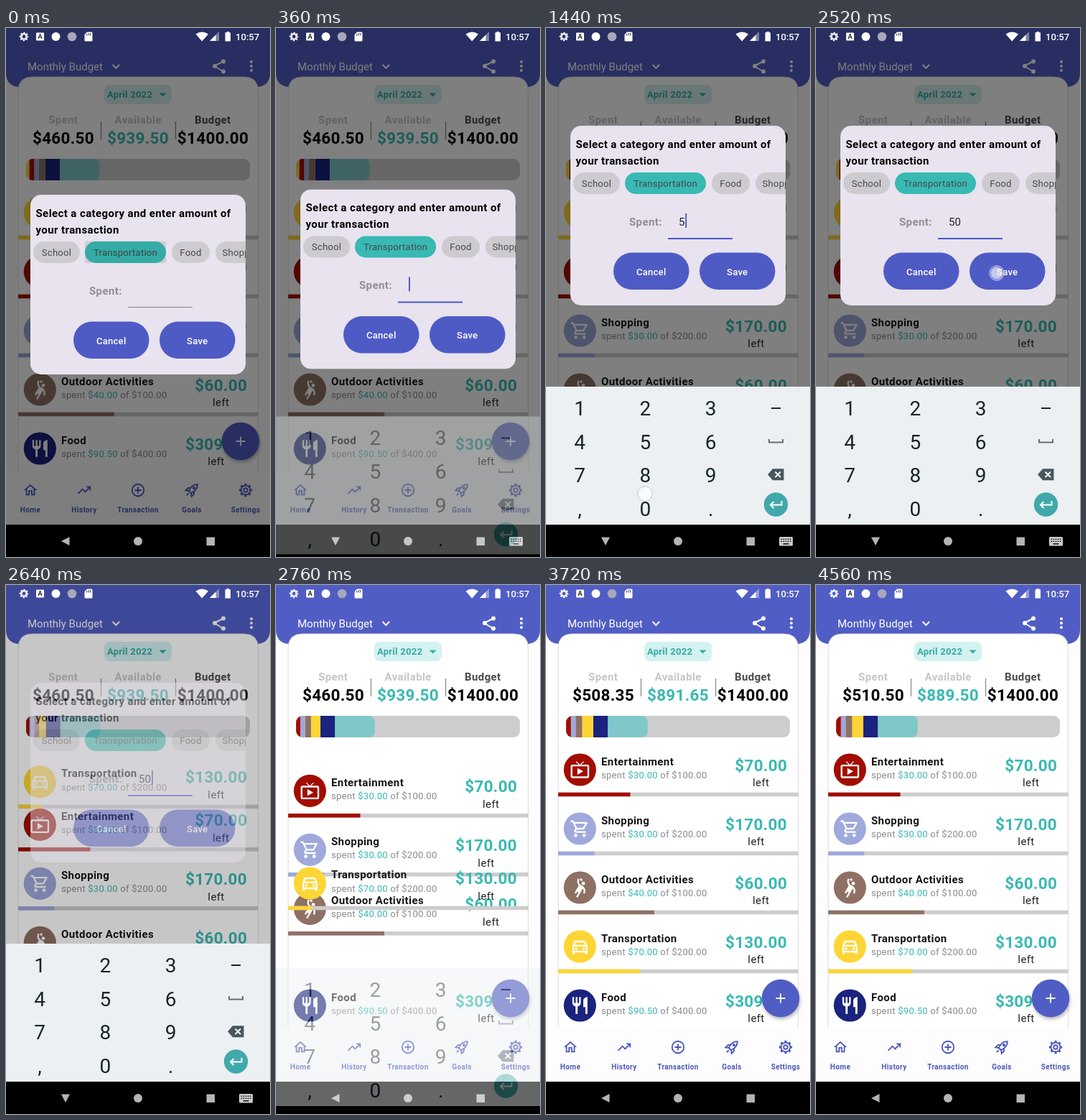
Recreate the animation shown at these times as an HTML page. Size 368 by 736 pixels, loop 4.8 s.

```html
<!DOCTYPE html>
<html lang="en">
<head>
<meta charset="utf-8">
<title>Monthly Budget</title>
<style>
  :root { --t: 0; --indigo: #505dc4; --teal: #39b9b2; }
  html, body { margin: 0; width: 100%; height: 100%; overflow: hidden; background: #fff; }
  svg { display: block; width: 368px; height: 736px; font-family: Roboto, "Noto Sans", sans-serif; }
  .body { font-size: 15px; letter-spacing: .4px; }
  .small { font-size: 13.1px; letter-spacing: .23px; }
  .big { font-size: 22.5px; letter-spacing: .3px; font-weight: 700; }
  .tab { font-size: 10px; letter-spacing: .4px; font-weight: 700; }
  .key { font-size: 28px; fill: #16242b; }
  .bold { font-weight: 700; }
  .mid { text-anchor: middle; }
  .line { fill: none; stroke: currentColor; stroke-width: 2; }

  /* The clock in --t drives every paused animation. */
  .dialog, .scrim, .lift, .keys, .move, .grow, .slot {
    animation: 4800ms linear calc(var(--t) * -1ms) infinite both paused;
  }
  .dialog, .scrim { animation-name: close; }
  .lift { animation-name: lift; }
  .keys { animation-name: keys; }
  .move { animation-name: move; }
  .grow { animation-name: grow; }
  .slot { animation-name: slot, tint; }

  @keyframes close { 0%, 53.4% { opacity: 1 } 56.3%, 100% { opacity: 0 } }
  @keyframes lift {
    0%, 7.3% { transform: none; animation-timing-function: ease-out }
    11.5%, 100% { transform: translateY(-96px) }
  }
  @keyframes keys {
    0%, 6.5% { transform: translateY(60px); opacity: 0; animation-timing-function: ease-out }
    11.5%, 55% { transform: none; opacity: 1 }
    57.5% { transform: translateY(34px); opacity: .43 }
    60%, 100% { transform: translateY(68px); opacity: 0 }
  }
  @keyframes move {
    0%, 53.85% { transform: translateY(var(--from)); animation-timing-function: ease-in-out }
    60.1%, 100% { transform: none }
  }
  @keyframes grow { 0%, 57.56% { width: 33.5px } 78.4%, 100% { width: 117px } }
  @keyframes slot {
    0%, 53.85% { x: var(--x0); width: var(--w0); animation-timing-function: ease-in-out }
    60.1%, 100% { x: var(--x1); width: var(--w1) }
  }
  @keyframes tint { 0%, 53.85% { fill: var(--c0) } 53.86%, 100% { fill: var(--c1) } }

  .typing .back { transform: rotate(-90deg); }
  .back { transform-origin: 83px 714px; }
  .kbIcon { visibility: hidden; }
  .typing .kbIcon { visibility: visible; }
  .underline { fill: #85818a; height: 1px; }
  .focused .underline { fill: #4957c6; height: 2px; }
</style>
</head>
<body>
<svg id="stage" viewBox="0 0 368 736">
  <defs>
    <clipPath id="barClip"><rect x="28" y="182" width="312" height="30" rx="9"/></clipPath>
    <clipPath id="dialogClip"><rect x="34" y="232" width="300" height="250" rx="15"/></clipPath>
    <filter id="soft" x="-30%" y="-30%" width="160%" height="160%"><feGaussianBlur stdDeviation="2.5"/></filter>
  </defs>

  <rect width="368" height="736" fill="#fdfcfe"/>
  <path d="M0 0H368V62Q368 82 348 82H20Q0 82 0 62Z" fill="var(--indigo)"/>

  <g color="#fff" fill="#fff">
    <text x="30" y="59" font-size="15">Monthly Budget</text>
    <path class="line" d="M148.500 51L153.300 55.800L158.100 51"/>
    <path class="line" stroke-width="1.6" d="M292 52L302 47M292 54L302 60"/>
    <circle cx="291" cy="53" r="3"/><circle cx="303" cy="46.500" r="3"/><circle cx="303" cy="60.500" r="3"/>
    <circle cx="342" cy="47" r="2"/><circle cx="342" cy="53" r="2"/><circle cx="342" cy="59" r="2"/>
  </g>

  <path d="M17 620V88Q17 68 37 68H331.500Q351.500 68 351.500 88V620" fill="#fff" stroke="#dcdce0"/>
  <rect x="137" y="79" width="94" height="27" rx="8" fill="#d3f2f0"/>
  <text class="small bold" x="141" y="97.300" fill="#37aca6">April 2022</text>
  <path d="M213.500 90.500H223.500L218.500 95.500Z" fill="#37aca6"/>

  <g class="body bold mid">
    <text x="79.700" y="133.300" fill="#c6c6c8">Spent</text>
    <text x="184.200" y="133.300" fill="#c6c6c8">Available</text>
    <text x="288.300" y="133.300" fill="#4a4a4c">Budget</text>
  </g>
  <path d="M132.500 130V155M236.500 130V155" stroke="#8c8c8e" stroke-width="1.300"/>
  <g class="big mid">
    <text id="spent" x="80" y="161">$460.50</text>
    <text id="avail" x="184" y="161" fill="var(--teal)">$939.50</text>
    <text x="288.500" y="161">$1400.00</text>
  </g>
  <rect x="28" y="182" width="312" height="30" rx="9" fill="#cdcdcd"/>
  <g id="bar" clip-path="url(#barClip)"></g>

  <g id="rows"></g>
  <rect y="615.500" width="368" height="76" fill="#fdfdff"/>
  <g id="tabs" color="#4c58b9"></g>
  <circle cx="328" cy="578" r="26" opacity=".3" filter="url(#soft)"/>
  <circle cx="327" cy="575" r="26.300" fill="var(--indigo)"/>
  <path d="M320.500 575H333.500M327 568.500V581.500" stroke="#fff" stroke-width="1.800"/>

  <rect class="scrim" width="368" height="692" fill-opacity=".5"/>

  <g class="dialog"><g class="lift">
    <rect x="34" y="232" width="300" height="250" rx="15" fill="#e8e3ee"/>
    <g class="body bold">
      <text x="41.500" y="262.500">Select a category and enter amount of</text>
      <text x="41.500" y="285.500">your transaction</text>
      <text x="116" y="370.500" fill="#918d95">Spent:</text>
    </g>
    <rect id="press" x="110" y="296.500" width="113" height="30.500" opacity=".1"/>
    <g id="chips" clip-path="url(#dialogClip)"></g>
    <rect class="underline" x="170" y="388" width="90"/>
    <text id="typed" x="185" y="370.500" font-size="15" fill="#222"></text>
    <rect id="caret" y="354" width="1.800" height="20" fill="#4453c4"/>
    <g fill="#4f5bc5">
      <rect x="94" y="408.500" width="105.500" height="51.500" rx="25.700"/>
      <rect x="214" y="408.500" width="105.500" height="51.500" rx="25.700"/>
    </g>
    <g class="small mid" font-weight="500" fill="#fff">
      <text x="146.700" y="439.500">Cancel</text>
      <text x="266.700" y="439.500">Save</text>
    </g>
  </g></g>

  <g id="status" fill="#fff" color="#fff">
    <rect x="42" y="6.500" width="11" height="11" rx="1"/>
    <text class="mid" x="47.500" y="15.200" font-size="9" font-weight="700" fill="#222">A</text>
    <circle cx="69.500" cy="12" r="6"/>
    <circle cx="92" cy="12" r="6.300" fill="#aaa6bb"/>
    <path d="M113 5.500H119Q120.500 5.500 120.500 7V17Q120.500 18.500 119 18.500H111Q109.500 18.500 109.500 17V9Z"/>
    <path d="M112.500 8V10.500M115 7V10.500M117.500 7V10.500" stroke="#555" stroke-width="1.200"/>
    <path d="M264.500 8.500Q273.200 2.500 282 8.500L273.200 18.500Z"/>
    <path d="M297 5V18H284Z" opacity=".4"/><path d="M292.500 9.500V18H284Z"/>
    <path d="M307.500 5H311V6.300H313V18.500H305.500V6.300H307.500Z"/>
    <text x="320" y="16.600" font-size="13.100" font-weight="500">10:57</text>
  </g>

  <rect y="691" width="368" height="45"/>
  <g fill="#b4b4b4">
    <path class="back" d="M77 714L88.500 708V720Z"/>
    <circle cx="184" cy="714" r="6"/>
    <rect x="279.500" y="708.500" width="11.500" height="11.500"/>
    <g class="kbIcon">
      <rect x="325" y="708" width="19" height="12.500" rx="1.500" fill="#ccc"/>
      <path d="M327.500 711.300H342M327.500 714.300H342" stroke="#111" stroke-width="1.500" stroke-dasharray="1.600 1.500"/>
      <path d="M330.500 717.700H338.500" stroke="#111" stroke-width="1.500"/>
    </g>
  </g>

  <g class="keys">
    <rect y="499" width="368" height="192" fill="#ecf0f2"/>
    <g id="pad" class="key mid"></g>
    <path d="M314 529H327" stroke="#16242b" stroke-width="2"/>
    <path class="line" color="#6c687a" d="M311 572V576.500H330V572"/>
    <path d="M309 621.300L316 613.300H331.500V629.300H316Z" fill="#48565f"/>
    <path d="M319.500 617.500L327 625M327 617.500L319.500 625" stroke="#fff" stroke-width="1.800"/>
    <circle cx="320.500" cy="663" r="16.700" fill="#41a9ab"/>
    <path class="line" color="#fff" d="M328.500 658V663.500H313.500M317.500 659L313 663.500L317.500 668"/>
  </g>

  <g id="tap">
    <circle r="10.500" fill="#fff" fill-opacity=".35" stroke="#b4bae6" stroke-opacity=".7"/>
    <circle r="8" fill="#fff" fill-opacity=".5"/>
  </g>
</svg>

<script>
const $ = id => document.getElementById(id);
const LOOP = 4800, STEP = 120, SAVED = 2585;
const RED = '#a30d00', BLUE = '#9fa9db', BROWN = '#8f7064',
      YELLOW = '#fdd535', NAVY = '#1a237e', AQUA = '#7fc7c9';

// Icons on a 24-unit grid
const gear = (r, hole) => `<g class="line">
  <circle cx="12" cy="12" r="${hole}"/><circle cx="12" cy="12" r="${r}"/>
  <circle cx="12" cy="12" r="${r + 1.8}" stroke-width="2.4" pathLength="16" stroke-dasharray="1" stroke-dashoffset=".5"/></g>`;
const path = d => `<path fill-rule="evenodd" d="${d}"/>`;
const icons = {
  tv: path('M21 6h-7.590l3.290-3.290L16 2l-4 4-4-4-.710.710L10.590 6H3c-1.100 0-2 .890-2 2v12c0 1.100.900 2 2 2h18c1.100 0 2-.900 2-2V8c0-1.110-.900-2-2-2zM21 20H3V8h18v12zM9 10v8l7-4z'),
  cart: path('M15.550 13c.750 0 1.410-.410 1.750-1.030l3.580-6.490c.370-.660-.110-1.480-.870-1.480H5.210l-.940-2H1v2h2l3.600 7.590-1.350 2.440C4.520 15.370 5.480 17 7 17h12v-2H7l1.100-2h7.450zM6.160 6h12.150l-2.760 5H8.530L6.160 6z')
    + '<circle cx="7" cy="20" r="2"/><circle cx="17" cy="20" r="2"/>',
  player: path('M15.840 10.410s-1.630-.940-2.600-1.500c-2.380-1.380-3.200-4.440-1.820-6.820l-1.730-1C8.100 3.830 8.600 7.210 10.660 9.400l-5.150 8.920 1.730 1 1.500-2.600 1.730 1-3 5.200 1.730 1 6.290-10.890c1.140 1.550 1.330 3.690.310 5.460l1.730 1c1.600-2.750 1.280-6.580-1.690-9.080z')
    + '<circle cx="13.500" cy="2.500" r="1.500"/><circle cx="16" cy="7" r="2"/>',
  car: path('M18.920 6C18.720 5.420 18.160 5 17.500 5h-11c-.660 0-1.210.420-1.420 1L3 12v8c0 .550.450 1 1 1h1c.550 0 1-.450 1-1v-1h12v1c0 .550.450 1 1 1h1c.550 0 1-.450 1-1v-8zM6.850 7h10.290l1.080 3.110H5.770zM19 17H5v-5h14z')
    + '<circle cx="7.500" cy="14.500" r="1.500"/><circle cx="16.500" cy="14.500" r="1.500"/>',
  food: path('M11 9H9V2H7V9H5V2H3V9C3 11.120 4.660 12.840 6.750 12.970V22H9.250V12.970C11.340 12.840 13 11.120 13 9V2H11ZM16 6V14H18.500V22H21V2C18.240 2 16 4.240 16 6Z'),
  home: path('M12 5.690L17 10.190V18H15V12H9V18H7V10.190ZM12 3L2 12H5V20H11V14H13V20H19V12H22Z'),
  trend: '<path class="line" d="M2.700 17.300L9.400 10.600L13.400 14.600L20.500 7.500M15.500 7H21V12.500"/>',
  plus: '<g class="line"><circle cx="12" cy="12" r="9"/><path d="M7 12H17M12 7V17"/></g>',
  rocket: `<g class="line" transform="rotate(45 12 12)"><path d="M12 0C16.500 4 16.500 10 14.500 16H9.500C7.500 10 7.500 4 12 0Z"/>
    <circle cx="12" cy="7.500" r="1.200"/><path d="M8.500 10.500L5.500 14V19L9.500 16M15.500 10.500L18.500 14V19L14.500 16M12 18.500V23"/></g>`,
  cog: gear(7, 3),
  solidCog: gear(6.5, 4.6),
};
const icon = (name, x, y, size) =>
  `<g fill="currentColor" transform="translate(${x - size / 2} ${y - size / 2}) scale(${size / 24})">${icons[name]}</g>`;

// Category rows: name, colour, icon, spent, total, x of the sum, start offset
const rows = [
  ['Entertainment', RED, 'tv', 30, 100, 299.7, 82],
  ['Shopping', BLUE, 'cart', 30, 200, 293, 82],
  ['Outdoor Activities', BROWN, 'player', 40, 100, 299.7, 82],
  ['Transportation', YELLOW, 'car', 70, 200, 293, -246],
  ['Food', NAVY, 'food', 90.5, 400, 293, 0],
];
const money = n => '$' + n.toFixed(2);
$('rows').innerHTML = rows.map(([name, color, pic, used, total, x, from], i) => {
  const live = name === 'Transportation';
  return `<g class="move" style="--from:${from}px"><g transform="translate(0 ${257 + 82 * i})">
    <circle cx="47.300" r="22.600" fill="${color}"/><g color="#fff">${icon(pic, 47.3, 0, 28)}</g>
    <text class="body bold" x="77" y="-6.500" fill="#151515">${name}</text>
    <text class="small" x="77" y="12" fill="#8b8b8d">spent <tspan fill="var(--teal)"${live ? ' id="used"' : ''}>${money(used)}</tspan> of ${money(total)}</text>
    <text class="big mid" x="${x}" y="1.500" fill="var(--teal)"${live ? ' id="left"' : ''}>${money(total - used)}</text>
    <text class="body mid" x="${x}" y="23.300" fill="#222">left</text>
    <rect x="17" y="31.700" width="335" height="5.500" fill="#cdcdcd"/>
    <rect x="17" y="31.700" width="${335 * used / total}" height="5.500" fill="${color}"${live ? ' class="grow"' : ''}/>
  </g></g>`;
}).join('');

// Summary bar: slots keep their place while sums and colours change
const before = [[20, YELLOW], [30, RED], [30, BLUE], [40, BROWN], [90.5, NAVY], [250, AQUA]];
const after = [[30, RED], [30, BLUE], [40, BROWN], [70, YELLOW], [90.5, NAVY], [250, AQUA]];
const spans = list => {
  let x = 28;
  return list.map(([sum, color]) => {
    const w = sum / 1400 * 312, span = { x, w, color };
    x += w;
    return span;
  });
};
const a = spans(before), b = spans(after);
$('bar').innerHTML = a.map((s, i) => {
  const e = b[i], last = i === 5, pad = last ? 10 : 0;
  return `<rect class="slot" y="182" height="30" rx="${last ? 8 : 0}" style="--x0:${s.x - pad}px;--w0:${s.w + pad}px;
    --x1:${e.x - pad}px;--w1:${e.w + pad}px;--c0:${s.color};--c1:${e.color}"/>`;
}).reverse().join('');

$('tabs').innerHTML = [['Home', 'home'], ['History', 'trend'], ['Transaction', 'plus'], ['Goals', 'rocket'], ['Settings', 'cog']]
  .map(([name, pic], i) => icon(pic, 34 + 75 * i, 643, 22) +
    `<text class="tab mid" x="${34 + 75 * i}" y="673.500" fill="currentColor">${name}</text>`).join('');

$('chips').innerHTML = [['School', 38, 65], ['Transportation', 110, 113], ['Food', 231, 53], ['Shopping', 292, 76]]
  .map(([name, x, w], i) => `<rect x="${x}" y="297" width="${w}" height="30" rx="15" fill="${i === 1 ? '#38b9b3' : '#cdcbcf'}"/>
    <text class="small mid" x="${x + w / 2}" y="316.800" fill="#47474b">${name}</text>`).join('')
  + '<rect id="shade" x="110" y="297" width="113" height="30" rx="15" opacity=".08"/>';

$('pad').innerHTML = [...'123456789,0.'].map((k, i) =>
  `<text x="${47 + 91.3 * (i % 3)}" y="${539 + 46.7 * Math.floor(i / 3)}">${k}</text>`).join('');

$('status').insertAdjacentHTML('beforeend', icon('solidCog', 25, 12, 16));

// Touches: start, end, x, y
const taps = [[120, 360, 198, 371], [840, 1080, 138, 590], [1320, 1560, 138, 648], [2400, 2640, 252, 341]];
// Moments when the field takes focus or a digit, with text and caret place
const input = [[360, '', 185], [1080, '5', 194.3], [1560, '50', 203]];

function draw(t) {
  document.documentElement.style.setProperty('--t', t);
  const stage = $('stage').classList;
  stage.toggle('typing', t >= 360 && t < 2700);
  stage.toggle('focused', t >= 360);

  const pressed = t < 120 ? 'visible' : 'hidden';
  $('press').style.visibility = $('shade').style.visibility = pressed;

  const state = input.filter(s => s[0] <= t).pop();
  $('typed').textContent = state ? state[1] : '';
  $('caret').setAttribute('x', state ? state[2] : 0);
  $('caret').style.visibility = state && (t - state[0]) % 1000 < 500 ? 'visible' : 'hidden';

  const tap = taps.find(([from, to]) => t >= from && t < to);
  $('tap').style.visibility = tap ? 'visible' : 'hidden';
  if (tap) $('tap').setAttribute('transform', `translate(${tap[2]} ${tap[3]})`);

  const p = Math.min(1, Math.max(0, (t - 2763) / 1000));
  $('spent').textContent = money(460.5 + 50 * p);
  $('avail').textContent = money(939.5 - 50 * p);
  const used = t < SAVED ? 20 : 70;
  $('used').textContent = money(used);
  $('left').textContent = money(200 - used);
}

const start = performance.now();
function tick() {
  const t = (performance.now() - start) % LOOP;
  draw(Math.floor(t / STEP) * STEP);
  requestAnimationFrame(tick);
}
tick();
</script>
</body>
</html>
```
